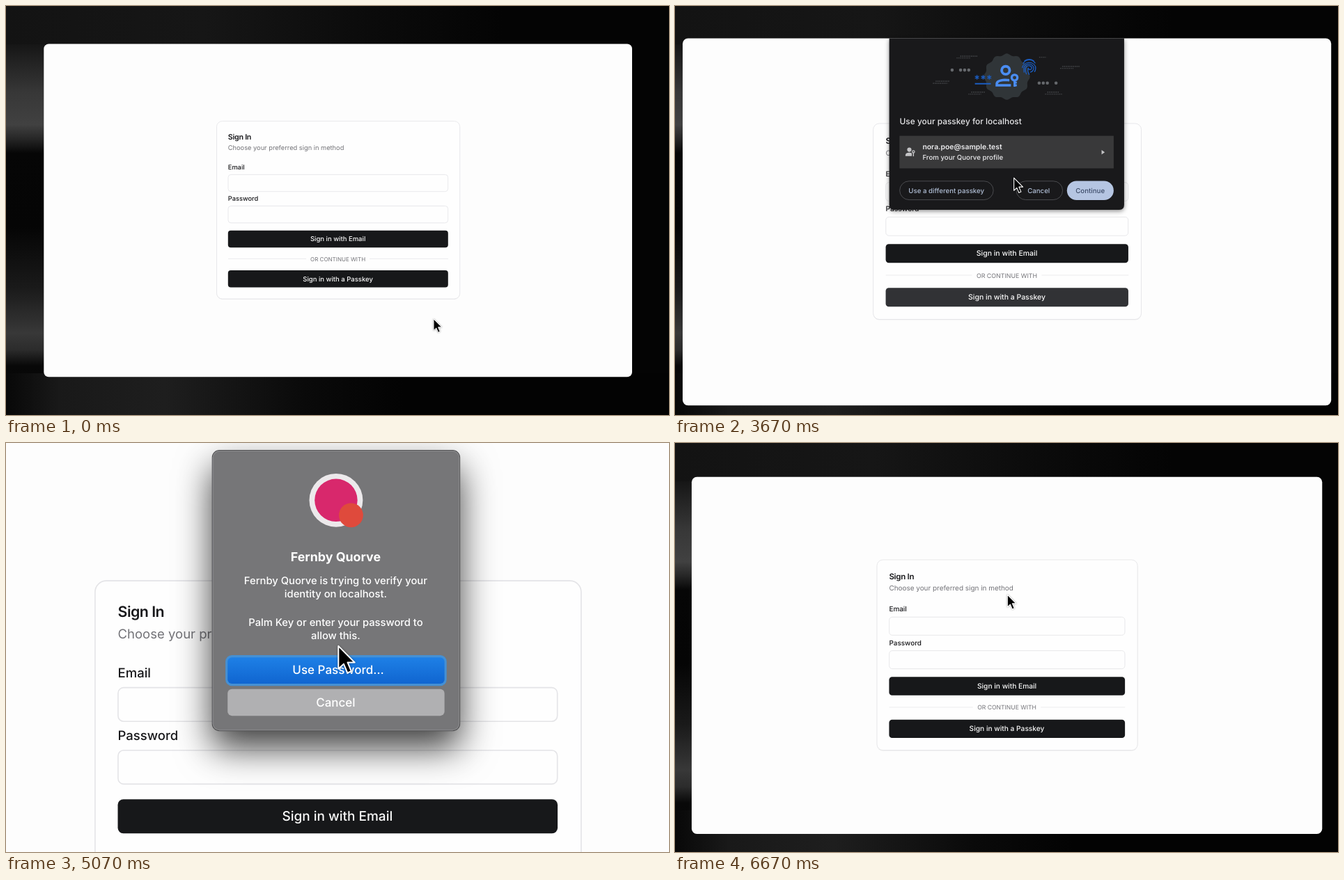
Recreate the animation shown at these times as an HTML page. Size 952x588 px, loop 6740 ms.

```html
<!DOCTYPE html>
<html lang="en">
<head>
<meta charset="utf-8">
<title>Passkey sign in</title>
<style>
  html, body { margin: 0; width: 100%; height: 100%; overflow: hidden; }
  body {
    background:
      linear-gradient(90deg, #131313, #161616 30%, #0b0b0b 55%, #040404 75%) 0 0 / 952px 55px no-repeat,
      linear-gradient(90deg, #080808, #191919 8%, #1e1e1e 24%, #0a0a0a 45%, #030303 60%) 0 528px / 952px 60px no-repeat,
      linear-gradient(#131313, #151515 9%, #373737 21%, #414141 29%, #262626 32.5%, #060606 36%, #050505 54%,
        #1a1a1a 69%, #383838 80%, #2c2c2c 84%, #080808 88%, #060606) 0 0 / 56px 588px no-repeat,
      #040404;
  }
  svg { display: block; width: 952px; height: 588px; }
  text { font-family: Inter, "Liberation Sans", sans-serif; text-rendering: geometricPrecision; white-space: pre; }
  .mid { text-anchor: middle; }
  .med { font-weight: 500; }
  .bold { font-weight: 600; }
  #page { font-size: 9.27px; fill: #18181b; }
  .field { fill: #fefefe; stroke: #e4e4e7; stroke-width: .8; }
  .button { fill: #17181a; }
  .light { fill: #fafafa; font-size: 9.5px; }
  .muted { fill: #737378; }
  #passkey { filter: drop-shadow(0 3px 5px rgba(0, 0, 0, .45)); font-size: 14.8px; }
  #verify { filter: drop-shadow(0 24px 25px rgba(0, 0, 0, .75)); font-size: 14.4px; fill: #fff; }
  .blue { fill: none; stroke: #4a8df2; }
  .deep { fill: none; stroke: #1b5ec4; }
  .dots { stroke: #55585c; stroke-width: 1.7; stroke-dasharray: 2 1.9; }
  .pill { fill: none; stroke: #58595d; stroke-width: 1.2; }
  #cursor { filter: drop-shadow(0 .8px .8px rgba(0, 0, 0, .4)); stroke-linejoin: round; }
</style>
</head>
<body>
<svg viewBox="0 0 952 588">
  <defs>
    <linearGradient id="press" x2="0" y2="1">
      <stop stop-color="#1e80e6"/><stop offset="1" stop-color="#1065d0"/>
    </linearGradient>
  </defs>
  <g id="camera">
    <g id="page">
      <rect x="54.3" y="54.5" width="844.7" height="478.7" rx="7" fill="#fdfdfd"/>
      <rect x="302.5" y="166.3" width="349.2" height="255.6" rx="8" fill="#ededee"/>
      <rect class="field" x="302.5" y="165.6" width="349.2" height="255.4" rx="8"/>
      <text class="bold" x="318.8" y="191.6" font-size="10.7" letter-spacing="-.26">Sign In</text>
      <text class="muted" x="318.8" y="207.1">Choose your preferred sign in method</text>
      <text class="med" x="318.8" y="235">Email</text>
      <rect class="field" x="319" y="242.4" width="315.6" height="24.3" rx="4"/>
      <text class="med" x="318.8" y="280">Password</text>
      <rect class="field" x="319" y="287.5" width="315.6" height="24.3" rx="4"/>
      <rect class="button" x="318.8" y="322.7" width="316" height="24.6" rx="4"/>
      <text class="med mid light" x="476.6" y="338.4">Sign in with Email</text>
      <path d="M319 363.4H431M522 363.4H635" stroke="#e4e4e7" stroke-width=".7"/>
      <text class="mid muted" x="476.6" y="366.7" font-size="8">OR CONTINUE WITH</text>
      <rect class="button" id="keyButton" x="318.8" y="379.9" width="316" height="24.6" rx="4"/>
      <text class="med mid light" x="476.6" y="395.6">Sign in with a Passkey</text>
    </g>

    <g id="passkey">
      <path d="M218 .8H733.5V367q0 10.5-10.5 10.5H228.5q-10.5 0-10.5-10.5Z" fill="#19191b"/>
      <path id="badge" fill="#303538"/>
      <path class="dots" d="M374 40H411M366 44H396M547 42.5H563M598 62.5H637M593 67H622M320 95H350M314 99.5H346M398 119H428M392 123.5H420M565 119H590M560 123.5H597"/>
      <g id="beads" fill="#66696d"></g>
      <circle class="blue" cx="473.5" cy="71" r="8.7" stroke-width="6"/>
      <path class="blue" d="M482 93Q478 92 472 92Q454 93 454 101V104H485" stroke-width="5.5"/>
      <circle cx="493" cy="88" r="12" fill="#303538"/>
      <circle class="blue" cx="493" cy="87" r="6.3" stroke-width="5"/>
      <path class="blue" d="M493 93V107M494 98H498M494 104H498" stroke-width="4.5"/>
      <path id="stars" class="deep" stroke-width="2"/>
      <path class="deep" d="M406 100.5H441" stroke-width="3"/>
      <path class="deep" stroke-width="2" stroke-linecap="round"
        d="M512 56a15 15 0 0 1 26-1M510 65a15 13 0 0 1 29-2q1 7-2 11M514 75q-1-6 0-11a11 10 0 0 1 21 1q0 8-7 10M519 79q-4-9-1-15a7 6 0 0 1 13 2q-2 6-7 2M525 80q-4-7-2-14M515 50q10-6 20 0"/>
      <text class="med" x="240.8" y="190" font-size="18.2" fill="#e6e6e8">Use your passkey for localhost</text>
      <rect id="row" x="240.5" y="215" width="470" height="71.5"/>
      <g fill="#c4c4c6">
        <circle cx="262" cy="245.5" r="4.7"/>
        <path d="M253.5 259.5V257q1-5 8.5-5q4 0 5.5 1.5V259.5ZM684 246L691 251L684 256Z"/>
        <path d="M271 251V260" stroke="#c4c4c6" stroke-width="2.2"/>
        <circle cx="271" cy="250" r="2.6" fill="none" stroke="#c4c4c6" stroke-width="1.9"/>
      </g>
      <g fill="#ececee">
        <text class="bold" x="291" y="245" font-size="15.9">nora.poe@sample.test</text>
        <text class="med" x="291" y="268">From your Quorve profile</text>
      </g>
      <rect class="pill" x="241" y="314.5" width="205.5" height="41" rx="20.5"/>
      <rect class="pill" x="497" y="314.5" width="101.5" height="41" rx="20.5"/>
      <rect x="608" y="314" width="102.5" height="42" rx="21" fill="#b5c5e2"/>
      <g class="med mid" fill="#b1bfd6">
        <text x="343.5" y="340.5">Use a different passkey</text>
        <text x="546" y="340.5">Cancel</text>
        <text x="659" y="340.5" fill="#3b4a67">Continue</text>
      </g>
    </g>

    <g id="verify">
      <rect x="300.5" y="13.5" width="347" height="393.5" rx="10" fill="#767678" stroke="#4b4b4d"/>
      <rect x="301.5" y="14.5" width="345" height="391.5" rx="9" fill="none" stroke="#8c8c8e"/>
      <circle cx="474" cy="83.5" r="37.5" fill="#ece9eb"/>
      <circle cx="474" cy="83.5" r="30" fill="#d8286c"/>
      <circle cx="495" cy="104.5" r="17" fill="#df4a3c"/>
      <g class="med mid">
        <text x="473.5" y="169.5" font-size="17.4" font-weight="700">Fernby Quorve</text>
        <text x="473.5" y="201">Fernby Quorve is trying to verify your</text>
        <text x="473.5" y="219.5">identity on localhost.</text>
        <text x="473.5" y="259.5">Palm Key or enter your password to</text>
        <text x="473.5" y="278">allow this.</text>
      </g>
      <rect x="319" y="301" width="310" height="43" rx="9" fill="#4590d4"/>
      <rect x="322" y="304" width="304" height="37" rx="6" fill="url(#press)"/>
      <rect x="322" y="348.5" width="304" height="37.5" rx="6" fill="#b0b0b2"/>
      <g class="med mid" font-size="16.6">
        <text x="477" y="327.5">Use Password…</text>
        <text x="473.5" y="373">Cancel</text>
      </g>
    </g>

    <g id="cursor">
      <path id="arrow" d="M0 0V16.4L3.8 12.9L6.5 19.3L9.3 18.1L6.6 11.8H11.7Z" fill="#000" stroke="#fff"/>
      <path id="hand" d="M-1.6 1.2a1.5 1.5 0 0 1 3 0V6.2a1.4 1.4 0 0 1 2.7.3a1.4 1.4 0 0 1 2.6.5a1.3 1.3 0 0 1 2.4.8V12.5Q9 15 8 17.5H1Q.5 15.5-1.5 13L-4.2 9.2Q-4.4 7.6-2.6 7.9L-1.6 9ZM2.2 11V15M4.5 11V15M6.7 11V15"
        fill="#fff" stroke="#000"/>
    </g>
  </g>
</svg>
<script>
const LOOP = 6740;
const DIALOG = 2530, VERIFY = 4130, CLOSE = 6300;
const $ = id => document.getElementById(id);
const clamp = v => Math.min(1, Math.max(0, v));
const show = (id, on) => $(id).style.display = on ? '' : 'none';

// Everything zooms around one point, where the pointer comes to rest.
const zoomTo = (id, k) =>
  $(id).setAttribute('transform', `translate(477.3 133) scale(${k}) translate(-477.3 -133)`);

// Overdamped spring for the zoom, critically damped spring for the pointer; t in ms.
function zoomEase(t, slow, fast = 14) {
  const s = Math.max(0, t) / 1000;
  return 1 - (fast * Math.exp(-slow * s) - slow * Math.exp(-fast * s)) / (fast - slow);
}
function glide(t, rate) {
  const x = Math.max(0, t) * rate / 1000;
  return 1 - (1 + x) * Math.exp(-x);
}
const zoomAt = t => 1 + zoomEase(t - 3603, 4.75) - zoomEase(t - 6012, 4.6);

function pointerAt(t) {
  const a = glide(t - 600, 10), b = glide(t - 3330, 10.4);
  return [614 - 72 * a - 64.7 * b, 450 - 54 * a - 183.5 * b];
}

function buildArt() {
  // The dialogs are drawn at the zoom at which they are read.
  zoomTo('passkey', 1 / 1.685);
  zoomTo('verify', 1 / 1.951);

  const ring = Array.from({ length: 145 }, (_, i) => {
    const a = i * Math.PI / 72, r = 48.8 + 2 * Math.cos(12 * a);
    return (476 + r * Math.sin(a)).toFixed(1) + ' ' + (85 - r * Math.cos(a)).toFixed(1);
  });
  $('badge').setAttribute('d', 'M' + ring.join('L') + 'Z');

  let stars = '';
  for (const x of [410.5, 424, 437.5])
    for (let k = 0; k < 3; k++) {
      const a = Math.PI / 2 + k * Math.PI / 3, dx = 5 * Math.cos(a), dy = 5 * Math.sin(a);
      stars += `M${x - dx} ${86.5 - dy}L${x + dx} ${86.5 + dy}`;
    }
  $('stars').setAttribute('d', stars);

  const row = (y, xs) => xs.map(x => `<circle cx="${x}" cy="${y}" r="3.5"/>`).join('');
  $('beads').innerHTML = row(70.5, [356, 374.5, 383.5, 392.5]) + row(99, [547, 556, 565, 584]);
}

function draw(t) {
  const zoom = zoomAt(t), [x, y] = pointerAt(t);
  zoomTo('camera', zoom);
  const blur = Math.abs(zoom - zoomAt(t - 8)) * 18;
  $('page').style.filter = blur > .06 ? `blur(${Math.min(.35, blur)}px)` : '';

  const over = y < 404 && t < CLOSE;
  $('keyButton').style.fill = over ? '#313235' : '';
  const grey = Math.round(57 + 27 * clamp((t - 3690) / 110));
  $('row').setAttribute('fill', `rgb(${grey},${grey},${grey + 1})`);

  show('passkey', t >= DIALOG && t < VERIFY);
  $('passkey').style.opacity = clamp((t - DIALOG) / 100);
  show('verify', t >= VERIFY && t < CLOSE);

  const pointing = over && t < DIALOG;
  show('hand', pointing);
  show('arrow', !pointing);
  $('cursor').setAttribute('transform', `translate(${x} ${y})`);
}

buildArt();
const start = performance.now();
function tick() {
  draw((performance.now() - start) % LOOP);
  requestAnimationFrame(tick);
}
tick();
</script>
</body>
</html>
```
